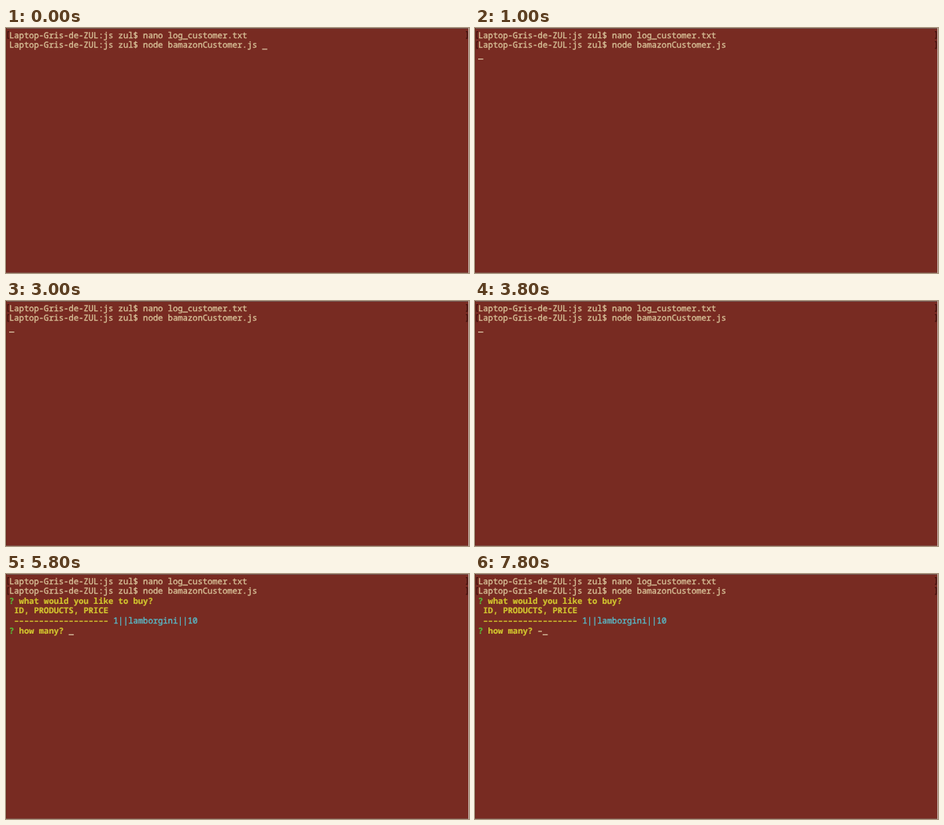
An HTML page for the animation above (8000 ms loop, 588 by 312 pixels).

```html
<!DOCTYPE html>
<html lang="en">
<head>
<meta charset="utf-8">
<title>Terminal shop</title>
<style>
  html, body { margin: 0; width: 100%; height: 100%; overflow: hidden; background: #782b22; }
  svg { display: block; width: 588px; height: 312px; }
  text {
    font: 500 10.5px "Noto Sans Mono", "DejaVu Sans Mono", monospace;
    white-space: pre;
    text-rendering: geometricPrecision;
    font-variant-ligatures: none;
    fill: currentColor;
    stroke: currentColor;
    stroke-width: .35px;
    color: #d8c198;
  }
  .bold { font-weight: 700; color: #d2c62f; stroke-width: .15px; }
  .green { font-weight: 700; color: #58bf3a; stroke-width: .15px; }
  .cyan { color: #58bccb; }
  .dim { color: #a0655a; }
  .cursor { fill: #dcc9a8; }
  .arrow { fill: none; stroke: #58bccb; stroke-width: 1.8; }
  .mark { fill: none; stroke: #40130e; stroke-width: 1.2; }
</style>
</head>
<body>
<svg id="stage" viewBox="0 0 588 312" xmlns="http://www.w3.org/2000/svg">
  <rect width="588" height="312" fill="#782b22"/>
  <rect width="588" height="1" fill="#735650"/>
  <rect width="1" height="312" fill="#6c261d"/>
  <rect y="311" width="588" height="1" fill="#7d4a42"/>
  <rect x="587" width="1" height="312" fill="#c4aaa2"/>
</svg>
<script>
const LOOP = 8000, LEFT = 4, CHAR = 6.3, ROW = 12.58, BASE = 12.7;
const stage = document.getElementById('stage');
const colX = col => LEFT + col * CHAR;
const rowY = row => BASE + row * ROW;

function add(parent, tag, attrs, content = '') {
  const el = document.createElementNS('http://www.w3.org/2000/svg', tag);
  for (const key in attrs) el.setAttribute(key, attrs[key]);
  el.textContent = content;
  parent.append(el);
  return el;
}

const write = (parent, row, col, content, style = '') =>
  add(parent, 'text', { x: colX(col), y: rowY(row), class: style }, content);

const cursor = (parent, row, col) =>
  add(parent, 'rect', { x: colX(col), y: rowY(row) + 1.1, width: 6.5, height: 1.2, class: 'cursor' });

function brackets(parent, row) {
  const y = rowY(row) - 8;
  add(parent, 'path', { d: `M4 ${y}H2.2v8.5H4M584 ${y}h1.8v8.5H584`, class: 'mark' });
}

// A layer is visible from start to end, with hard cuts.
function layer(start, end, draw) {
  const g = add(stage, 'g', {});
  draw(g);
  const steps = [{ opacity: start ? 0 : 1, offset: 0 }];
  if (start) steps.push({ opacity: 1, offset: start / LOOP });
  if (end < LOOP) steps.push({ opacity: 0, offset: end / LOOP });
  steps.push({ opacity: end < LOOP ? 0 : 1, offset: 1 });
  steps.forEach(s => s.easing = 'step-end');
  g.animate(steps, { duration: LOOP, iterations: Infinity });
}

const shell = 'Laptop-Gris-de-ZUL:js zul$ ';
const items = ['lamborgini||10', 'ferrary||9', 'mustang||8', 'cup||8', 'beer||8', 'vodka||8', 'chicken||8'];

brackets(stage, 0);
write(stage, 0, 0, shell + 'nano log_customer.txt');
write(stage, 1, 0, shell + 'node bamazonCustomer.js');

layer(0, 600, g => cursor(g, 1, 51));
layer(600, LOOP, g => brackets(g, 1));
layer(600, 4000, g => cursor(g, 2, 0));

layer(4000, LOOP, g => {
  write(g, 2, 0, '?', 'green');
  write(g, 2, 2, 'what would you like to buy?', 'bold');
  write(g, 3, 1, 'ID, PRODUCTS, PRICE', 'bold');
  write(g, 4, 1, '–'.repeat(19), 'bold');
});

layer(4000, 5200, g => {
  write(g, 4, 21, '(Use arrow keys)', 'dim');
  add(g, 'path', { d: 'M5.6 68.2L8.6 72L5.6 75.8', class: 'arrow' });
  items.forEach((item, i) => write(g, 5 + i, 2, `${i + 1}||${item}`, i ? '' : 'cyan'));
  write(g, 12, 0, '(Move up and down to reveal more choices)', 'dim');
});

layer(5200, LOOP, g => {
  write(g, 4, 21, '1||' + items[0], 'cyan');
  write(g, 5, 0, '?', 'green');
  write(g, 5, 2, 'how many?', 'bold');
});
layer(5200, 7400, g => cursor(g, 5, 12));
layer(7400, LOOP, g => {
  write(g, 5, 12, '–');
  cursor(g, 5, 13);
});
</script>
</body>
</html>
```
